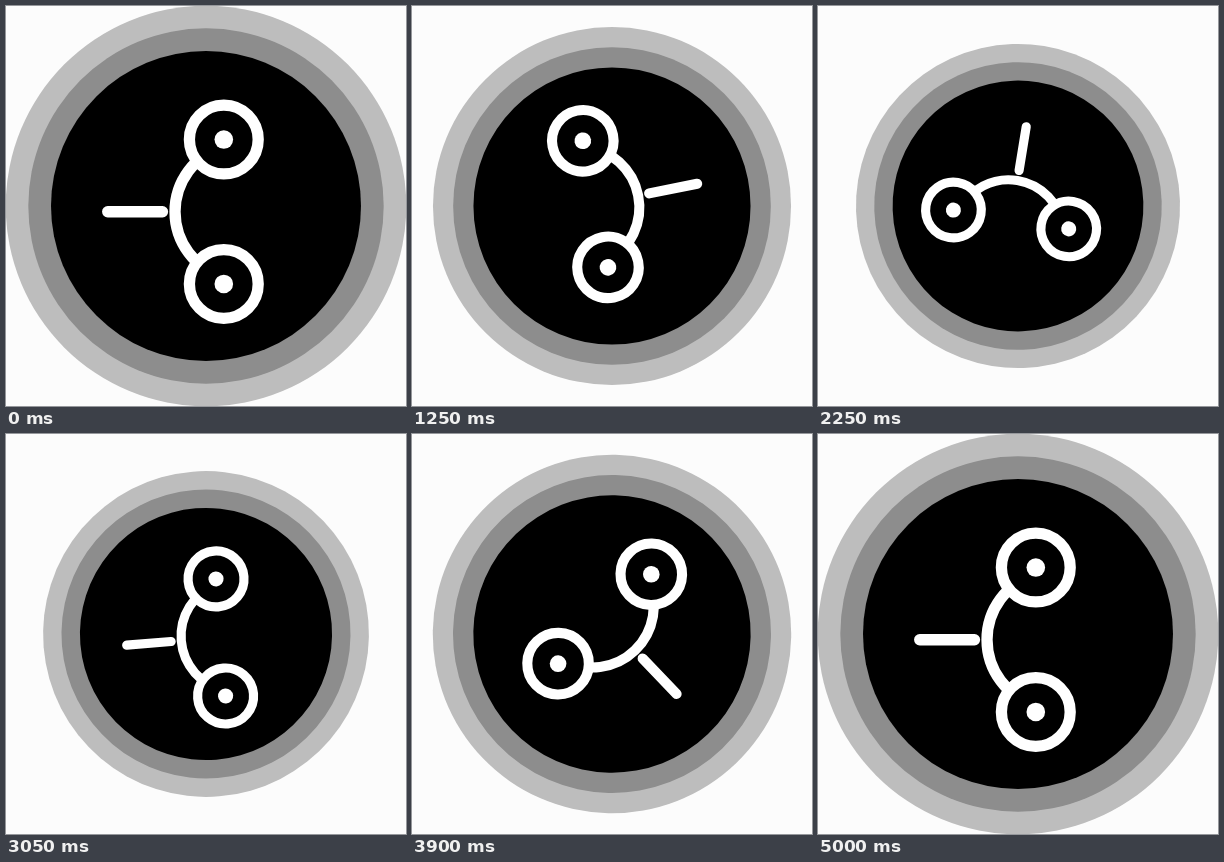
An HTML page that plays this animation: 400x400 px, repeating every 5.05 s.

```html
<!DOCTYPE html>
<html lang="en">
<head>
<meta charset="utf-8">
<title>Spinning bicycle badge</title>
<style>
  html, body { margin: 0; width: 100%; height: 100%; overflow: hidden; background: #fcfcfc; }
  svg { display: block; width: 100%; height: 100%; }
  .line { fill: none; stroke: #fff; stroke-width: 11.3; }
</style>
</head>
<body>
<svg viewBox="-200 -200 400 400">
  <defs>
    <g id="wheel">
      <circle class="line" r="34.4" style="fill:#000"/>
      <circle r="9.3" fill="#fff"/>
    </g>
  </defs>
  <g id="badge">
    <circle r="200.3" fill="#bdbdbd"/>
    <circle r="177.7" fill="#8d8d8d"/>
    <circle r="155"/>
    <!-- The bike is mirrored about its handlebar axis -->
    <g transform="translate(0 5.75)">
      <path class="line" d="M17.8 -65.6A68.5 68.5 0 0 0 17.8 65.6"/>
      <rect x="-90" y="-14.9" width="40" height="29.8"/>
      <path class="line" d="M-98.3 0H-43.5" stroke-linecap="round"/>
      <use href="#wheel" x="17.8" y="-72.2"/>
      <use href="#wheel" x="17.8" y="72.2"/>
    </g>
  </g>
</svg>
<script>
  const LOOP = 5050, SPIN = 5000, STEP = 50;
  const TURNS = 3, SMALLEST = 0.775, TURNING_POINT = 2650;
  const badge = document.getElementById('badge');
  const start = performance.now();

  const smooth = p => p * p * (3 - 2 * p);

  function scaleAt(t) {
    const shrink = t < TURNING_POINT
      ? t / TURNING_POINT
      : (SPIN - t) / (SPIN - TURNING_POINT);
    return 1 - (1 - SMALLEST) * shrink;
  }

  function draw() {
    const elapsed = Math.max(0, performance.now() - start) % LOOP;
    const t = Math.floor(elapsed / STEP) * STEP;
    const angle = 360 * TURNS * smooth(t / SPIN);
    badge.setAttribute('transform', `rotate(${angle}) scale(${scaleAt(t)})`);
    requestAnimationFrame(draw);
  }
  draw();
</script>
</body>
</html>
```
